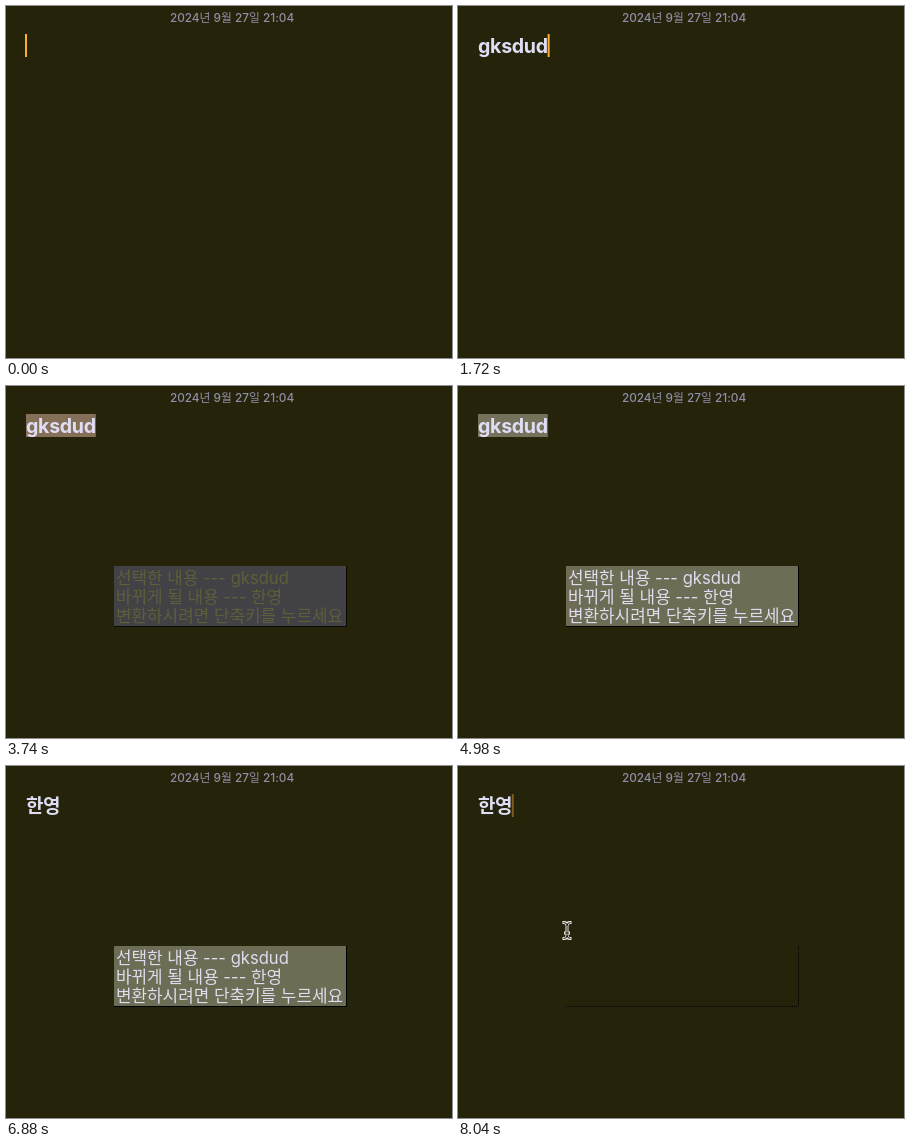
An HTML page that plays this animation: 446 px wide and 352 px high, repeating every 8060 ms.

```html
<!DOCTYPE html>
<html lang="ko">
<head>
<meta charset="utf-8">
<title>한영 변환</title>
<style>
  html, body { margin: 0; width: 100%; height: 100%; overflow: hidden; background: #25230a; }
  svg { display: block; width: 100%; height: 100%; }
  text { white-space: pre; }
  #date { font: 500 11.8px Inter, 'Noto Sans CJK KR', sans-serif; fill: #918ea8; text-anchor: middle; }
  #title { font: 700 19.6px Inter, sans-serif; letter-spacing: -.3px; fill: #dfddf4; }
  #title.ko { font: 700 19px 'Noto Sans CJK KR', sans-serif; letter-spacing: -.5px; }
  #lines text { font: 500 16.9px 'Noto Sans CJK KR', sans-serif; }
  #lines tspan { font: 400 16.6px Inter, sans-serif; }
  #beam path { fill: none; stroke-linecap: square; }
</style>
</head>
<body>
<svg viewBox="0 0 446 352">
  <rect width="446" height="352" fill="#25230a"/>
  <text id="date" x="226" y="16">2024년 9월 27일 21:04</text>
  <rect id="mark" x="20" y="28" height="23"/>
  <text id="title" x="20" y="47"></text>
  <rect id="caret" y="28" width="2" height="23" fill="#fdb02a"/>
  <path id="edge" d="M108 240.5H340.5V180" fill="none" stroke="#000"/>
  <g id="popup">
    <rect id="panel" x="108" y="180" width="232" height="60"/>
    <g id="lines">
      <text x="110" y="198">선택한 내용<tspan> --- gksdud</tspan></text>
      <text x="110" y="217">바뀌게 될 내용<tspan> --- </tspan>한영</text>
      <text x="110" y="236">변환하시려면 단축키를 누르세요</text>
    </g>
  </g>
  <g id="beam">
    <path id="beamOut" stroke="#ecebe6" stroke-width="3"/>
    <path id="beamIn" stroke="#15140a" stroke-width="1"/>
  </g>
</svg>
<script>
const LOOP = 8060, WORD = 'gksdud', RESULT = '한영';
const KEYS = [360, 560, 760, 1080, 1200, 1320];
const SELECT = 2660, REPLACE = 5950;
const BG = [37, 35, 10], PANEL = [109, 108, 84], PANEL_MID = [74, 73, 85];
const INK = [222, 220, 238], INK_MID = [111, 110, 72];
const SEL = [117, 114, 92], SEL_WARM = [140, 110, 86];

const $ = id => document.getElementById(id);
const set = (id, attrs) => {
  for (const k in attrs) $(id).setAttribute(k, attrs[k]);
};
const clamp = v => Math.max(0, Math.min(1, v));
const span = (t, a, b) => clamp((t - a) / (b - a));
const lerp = (a, b, k) => a + (b - a) * k;
const ease = k => 1 - (1 - k) ** 3;
const mix = (a, b, k) => a.map((v, i) => lerp(v, b[i], k));
const rgb = c => `rgb(${c.map(Math.round)})`;

// Piecewise linear value through [time, value] pairs
function track(t, pts) {
  let v = pts[0][1];
  for (let i = 1; i < pts.length; i++) {
    if (t >= pts[i - 1][0]) v = lerp(pts[i - 1][1], pts[i][1], span(t, pts[i - 1][0], pts[i][0]));
  }
  return v;
}

const CARET = [
  [0, 1], [2140, 1], [2260, 0], [2540, 0], [2640, 1], [SELECT, 1], [SELECT + 1, 0],
  [REPLACE, 0], [REPLACE + 1, 1], [6760, 1], [6880, 0], [7180, 0], [7300, 1], [7990, 1], [8060, .2]
];

function show(str) {
  const title = $('title');
  if (title.textContent === str) return;
  title.textContent = str;
  title.setAttribute('class', str === RESULT ? 'ko' : '');
}
function measure(str) {
  show(str);
  return str ? $('title').getComputedTextLength() : 0;
}
const widths = [...WORD + ' '].map((_, i) => measure(WORD.slice(0, i)));
const fullWidth = widths[WORD.length], resultWidth = measure(RESULT);
const stop = w => 19 + w + (w ? .8 : 0);

function drawText(t) {
  const n = KEYS.filter(k => t >= k).length;
  const done = t >= REPLACE;
  show(done ? RESULT : WORD.slice(0, n));

  let x = stop(done ? resultWidth : widths[n]);
  if (!done && n) x = lerp(stop(widths[n - 1]), x, ease(span(t, KEYS[n - 1], KEYS[n - 1] + 100)));
  set('caret', { x, opacity: track(t, CARET) });
  set('mark', {
    width: fullWidth,
    fill: rgb(mix(SEL_WARM, SEL, span(t, 3600, 4000))),
    opacity: t >= SELECT && !done ? 1 : 0
  });
}

function drawPopup(t) {
  const shown = Math.min(span(t, 3600, 3960), 1 - span(t, 7400, 7800));
  const shade = (full, mid) => rgb(shown > .5 ? mix(mid, full, shown * 2 - 1) : mix(BG, mid, shown * 2));
  set('popup', { opacity: shown > 0 ? 1 : 0 });
  set('panel', { fill: shade(PANEL, PANEL_MID) });
  set('lines', { fill: shade(INK, INK_MID) });
  const faded = t >= 7800;
  set('edge', {
    opacity: faded ? 1 : clamp(shown * 2),
    'stroke-dasharray': faded ? '1 1' : 'none'
  });
}

function drawBeam(t) {
  const x = track(t, [[7480, 105.5], [7600, 106.5], [7900, 109]]);
  const y = track(t, [[7480, 159.5], [7600, 161], [7900, 164.5]]);
  set('beam', { opacity: t >= 7480 ? 1 : 0, transform: `translate(${x} ${y})` });
}

const BEAM = 'M-3-8Q0-8 0-5V5Q0 8-3 8M3-8Q0-8 0-5M3 8Q0 8 0 5M-1.5 2.5H1.5';
set('beamOut', { d: BEAM });
set('beamIn', { d: BEAM });

const start = performance.now();
function frame() {
  const t = (performance.now() - start) % LOOP;
  drawText(t);
  drawPopup(t);
  drawBeam(t);
  requestAnimationFrame(frame);
}
frame();
</script>
</body>
</html>
```
